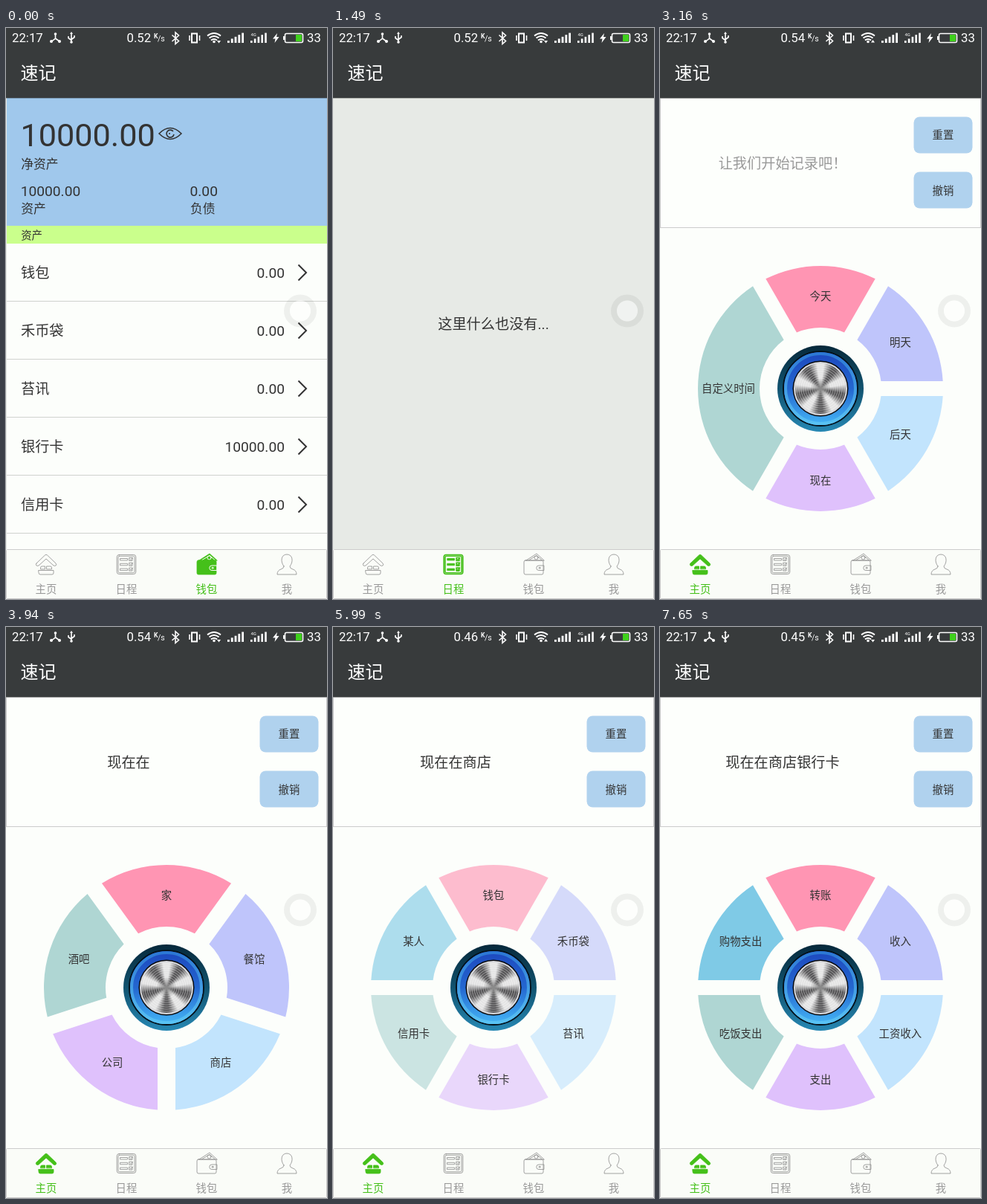
Write an HTML page that moves like this. It is 432 by 768 pixels and loops after 8000 ms.

```html
<!DOCTYPE html>
<html lang="zh-CN">
<head>
<meta charset="utf-8">
<title>速记</title>
<style>
  html, body { margin: 0; width: 100%; height: 100%; overflow: hidden; background: #fcfefb; }
  svg { display: block; }
  text { font-family: Roboto, "Noto Sans CJK SC", "Noto Sans CJK", sans-serif; fill: #333; }
  .mid { text-anchor: middle; }
  .end { text-anchor: end; }
  .s14 { font-size: 14.4px; }
  .s17 { font-size: 16.8px; }
  .s19 { font-size: 19.2px; }
  .menu text { fill-opacity: 1; }
  .status text { fill: #fff; font-size: 16.8px; }
  .line { fill: none; stroke: #fff; stroke-width: 1.6; }
  .tab text { fill: #999; }
  .tab .icon { fill: none; stroke: #8c8c8c; stroke-width: .8; stroke-linejoin: round; stroke-linecap: round; }
  .tab.on text { fill: #45c01a; }
  .tab.on .icon { stroke: #45c01a; stroke-width: 1.6; }
  .tab.on .solid { fill: #45c01a; stroke-width: .8; }
  .tab.on .cut { stroke: #fafcf8; stroke-width: 1; }
  .knob {
    width: 72px; height: 72px; border-radius: 50%; box-sizing: border-box; border: 2.5px solid #d8d9dd;
    background:
      radial-gradient(circle, #8a8a8a 0 2px, #8a8a8a00 14px),
      repeating-radial-gradient(circle, #fff0 0 1.2px, #ffffff50 1.8px 2.2px, #fff0 3px),
      repeating-conic-gradient(#e4e4e4 0 8deg, #555456 30deg 42deg, #e4e4e4 64deg 72deg);
  }
</style>
</head>
<body>
<svg width="432" height="768" viewBox="0 0 432 768">
  <defs>
    <linearGradient id="rimDark" x2="0" y2="1"><stop stop-color="#101116"/><stop offset="1" stop-color="#202333"/></linearGradient>
    <linearGradient id="bowlDark" x2="0" y2="1"><stop stop-color="#403e55"/><stop offset=".5" stop-color="#2b303e"/><stop offset="1" stop-color="#2a303c"/></linearGradient>
    <linearGradient id="rimBlue" x2="0" y2="1"><stop stop-color="#06283a"/><stop offset=".5" stop-color="#11536f"/><stop offset="1" stop-color="#2788b4"/></linearGradient>
    <linearGradient id="bowlBlue" x2="0" y2="1"><stop stop-color="#1d48be"/><stop offset=".5" stop-color="#2467d0"/><stop offset="1" stop-color="#45b6f6"/></linearGradient>
    <linearGradient id="edgeBlue" x2="0" y2="1"><stop stop-color="#2c78d4"/><stop offset="1" stop-color="#59c2f3"/></linearGradient>
  </defs>
  <rect width="432" height="768" fill="#fcfefb"/>

  <g id="strip">
    <g id="home">
      <rect x=".5" y="94.5" width="431" height="174" fill="#fdfffc" stroke="#ccc"/>
      <g id="phrases" class="mid s19"></g>
      <rect x="341.500" y="119.500" width="79" height="49" rx="8" fill="#b0d2ee"/>
      <rect x="341.500" y="193.500" width="79" height="49" rx="8" fill="#b0d2ee"/>
      <text class="mid s14" x="381" y="149">重置</text>
      <text class="mid s14" x="381" y="224">撤销</text>
      <g id="menus"></g>
      <g transform="translate(216 485)">
        <g id="idle">
          <circle r="58" fill="url(#rimDark)"/>
          <circle r="50" fill="url(#bowlDark)" stroke="#07080b" stroke-width="2"/>
          <circle r="44" fill="none" stroke="#3b4152" stroke-opacity=".5"/>
        </g>
        <g id="lit">
          <circle r="58" fill="url(#rimBlue)"/>
          <circle r="50" fill="url(#bowlBlue)" stroke="#04121c" stroke-width="2"/>
          <circle r="47" fill="none" stroke="url(#edgeBlue)" stroke-width="4"/>
        </g>
        <circle r="37.5" fill="#08090c"/>
        <foreignObject x="-36" y="-36" width="72" height="72"><div class="knob"></div></foreignObject>
      </g>
    </g>

    <g transform="translate(432)">
      <rect y="94" width="432" height="607" fill="#e7eae6"/>
      <text class="mid s19" x="216" y="405">这里什么也没有...</text>
    </g>

    <g id="wallet" transform="translate(864)">
      <rect y="94" width="432" height="172" fill="#a0c8ec"/>
      <text x="18.500" y="159" font-size="43.2">10000.00</text>
      <g fill="none" stroke="#333" stroke-width="1.6">
        <path d="M205 142Q220 127 235 142Q220 157 205 142Z"/>
        <path d="M224 139a5 5 0 1 0 1 4M220 142h-2"/>
      </g>
      <text class="s17" x="19.200" y="189">净资产</text>
      <text class="s19" x="18.700" y="226">10000.00</text>
      <text class="s17" x="19.200" y="249">资产</text>
      <text class="s19" x="246.500" y="226">0.00</text>
      <text class="s17" x="247" y="249">负债</text>
      <rect y="266" width="432" height="24" fill="#caff8c"/>
      <text class="s14" x="19.200" y="284">资产</text>
    </g>
  </g>

  <rect width="432" height="94" fill="#383b3c"/>
  <rect y="94" width="432" height="1" fill-opacity=".25"/>
  <text x="19.5" y="69" font-size="24" style="fill:#fff">速记</text>

  <g class="status">
    <text x="8" y="19">22:17</text>
    <g class="line">
      <path d="M66.500 8v6l-5 4M66.500 14l5.500 4"/>
      <path d="M88 7v12M84 11v2.500l4 3M92 10v2.500l-4 3"/>
      <path d="M223.500 9.500l9 8-4.500 4V6l4.500 4-9 8"/>
      <rect x="250" y="7.500" width="7" height="12" stroke-width="2"/>
      <path d="M247 10v7M260.500 10v7"/>
      <path d="M271 10.500q9-7 18 0M273.500 13.500q6.500-5 13 0M276 16.500q4-3 8 0" stroke-width="2"/>
      <rect x="375.500" y="7.500" width="24" height="12" rx="2"/>
    </g>
    <g fill="#fff">
      <circle cx="66.500" cy="8" r="1.800"/><circle cx="61" cy="18" r="2"/><circle cx="72" cy="18" r="2"/>
      <path d="M88 5l2 3h-4z"/><circle cx="88" cy="19" r="1.800"/>
      <circle cx="280" cy="18.500" r="1.800"/>
      <path id="arrowDown" d="M284 17h5l-2.500 3.500z"/>
      <path id="arrowUp" d="M284 19.500h5l-2.500-3.500z"/>
      <path d="M365 7l-6 7.500h3.500l-1 5.500 6-8h-3.500z"/>
      <rect x="373" y="11" width="2" height="5"/>
      <g id="bars"></g>
    </g>
    <rect x="390" y="9" width="8" height="9" fill="#3fd01c"/>
    <g id="speeds"></g>
    <text x="199" y="14" style="font-size:8.500px;font-weight:700">K</text>
    <text x="204" y="18" style="font-size:10.500px">/s</text>
    <text x="329.500" y="11" style="font-size:6px">4G</text>
    <text x="405" y="19">33</text>
  </g>

  <rect x=".5" y="701.500" width="431" height="66" rx="1" fill="#fafcf8" stroke="#ccc"/>
  <g id="tabs"></g>
  <circle cx="396" cy="380.500" r="18" fill="none" stroke="#000" stroke-opacity=".055" stroke-width="8"/>
  <circle cx="396" cy="380.500" r="14" fill="#fff" fill-opacity=".4"/>
</svg>

<script>
const LOOP = 8000;
const $ = id => document.getElementById(id);
const add = (id, markup) => $(id).insertAdjacentHTML('beforeend', markup);

// Wallet rows
[['钱包', '0.00'], ['禾币袋', '0.00'], ['苔讯', '0.00'], ['银行卡', '10000.00'], ['信用卡', '0.00']].forEach(([name, sum], i) => {
  const y = 290 + i * 78;
  add('wallet', `<text class="s19" x="19" y="${y + 46}">${name}</text>
    <text class="s19 end" x="374" y="${y + 46}">${sum}</text>
    <path d="M392.500 ${y + 28.5}l10.500 10.500-10.500 10.500" fill="none" stroke="#333" stroke-width="2"/>
    <rect y="${y + 77}" width="432" height="1" fill="#d0d2cf"/>`);
});

// Signal bars
[298, 329].forEach((x, k) => {
  for (let i = 0; i < 5; i++) {
    const h = 3 + i * 2.6;
    add('bars', `<rect x="${x + i * 4.8}" y="${20 - h}" width="${k ? 2.6 : 2.8}" height="${h}"/>`);
  }
});

// Tabs
const listRow = y => `<rect class="solid" x="-8" y="${y}" width="9.500" height="2.500"/>
  <rect x="4" y="${y - 1}" width="4" height="4"/><path d="M5 ${y + 1}l1.200 1 2.300-3"/>`;
const icons = [
  `<path class="solid" d="M-13 720L-1.500 709q1.500-1.300 3 0L13 720q1.500 2 0 3t-3 0L0 714-10 723q-1.500 1-3 0t0-3Z"/>
   <path class="solid" d="M-7.500 727.500V726q0-2 2-2H-1.500V727.500ZM.5 727.500V724H5.500q2 0 2 2V727.500Z"/>
   <path class="solid" d="M-10 729.500H10V733q0 2-2 2H-8q-2 0-2-2Z"/>`,
  `<rect x="-12.800" y="708.500" width="25.600" height="26" rx="3"/>
   <rect x="-11" y="710.300" width="22" height="22.400" rx="1.500"/>` + [713.5, 720.3, 727.1].map(listRow).join(''),
  `<path class="solid" d="M-10 716L4 707l10 9Z"/><circle class="cut" cx="3.500" cy="712.500" r="2.500"/>
   <path class="cut" d="M-6 715.500L4 709.500l7 6"/>
   <path class="solid" d="M-11 716H11q2 0 2 2V733q0 2-2 2H-11q-2 0-2-2V718q0-2 2-2Z"/>
   <path class="cut" d="M13.500 723H7a3 3 0 0 0 0 6.500h6.500Z"/><circle class="cut" cx="8" cy="726.200" r="1"/>`,
  `<path d="M-4 724C-9 718-8 708 0 708s9 10 4 16q0 3 4 4 5 1.500 5 7H-13q0-5.500 5-7 4-1 4-4Z"/>`
];
['主页', '日程', '钱包', '我'].forEach((name, i) => add('tabs',
  `<g class="tab" transform="translate(${54 + i * 108})"><g class="icon">${icons[i]}</g>
   <text class="mid s14" y="760">${name}</text></g>`));
const tabs = [...document.querySelectorAll('.tab')];

// Ring menus
const OUTER = 165, INNER = 82, LABEL = 124;
const point = (r, a) => `${(216 + r * Math.sin(a)).toFixed(2)} ${(485 - r * Math.cos(a)).toFixed(2)}`;

function slice(from, to, gap) {
  const o = Math.asin(gap / OUTER), n = Math.asin(gap / INNER);
  return `M${point(OUTER, from + o)}A${OUTER} ${OUTER} 0 0 1 ${point(OUTER, to - o)}` +
    `L${point(INNER, to - n)}A${INNER} ${INNER} 0 0 0 ${point(INNER, from + n)}Z`;
}

const colors = ['#ff95b3', '#bfc5fb', '#c2e4fd', '#dfc1fc', '#afd6d3', '#7fcae6'];

function ring(names, parts) {
  const step = 2 * Math.PI / parts;
  let from = -step / 2;
  return names.map((name, i) => {
    const to = i < names.length - 1 ? from + step : 2 * Math.PI - step / 2;
    const [x, y] = point(LABEL, (from + to) / 2).split(' ');
    const d = slice(from, to, 60 / parts);
    from = to;
    return `<path d="${d}" fill="${colors[i]}"/><text class="mid s14" x="${x}" y="${+y + 5.3}">${name}</text>`;
  }).join('');
}

const menus = [
  { names: '今天 明天 后天 现在 自定义时间', parts: 6,
    alpha: [[0, 0], [2610, .3], [2730, .65], [2850, .95], [3160, 1], [3300, .8], [3420, .4], [3540, 0]] },
  { names: '家 餐馆 商店 公司 酒吧', parts: 5,
    alpha: [[0, 0], [3540, .3], [3660, .6], [3810, .85], [3940, 1], [5870, 0]] },
  { names: '钱包 禾币袋 苔讯 银行卡 信用卡 某人', parts: 6,
    alpha: [[0, 0], [5870, .3], [5990, .62], [6110, .9], [6260, 1], [7410, .5], [7530, 0]] },
  { names: '转账 收入 工资收入 支出 吃饭支出 购物支出', parts: 6,
    alpha: [[0, 0], [7530, .5], [7650, 1]] }
];
menus.forEach(m => {
  add('menus', `<g class="menu">${ring(m.names.split(' '), m.parts)}</g>`);
  m.node = $('menus').lastElementChild;
});

// Texts that replace each other
const phrases = ['让我们开始记录吧！', '现在在', '现在在商店', '现在在商店银行卡'];
phrases.forEach((s, i) => add('phrases', `<text x="165" y="188.500"${i ? '' : ' style="fill:#999"'}>${s}</text>`));
['0.52', '0.54', '0.46', '0.45'].forEach(s => add('speeds', `<text x="162.500" y="19">${s}</text>`));

// Stepped tracks: [start in ms, value]
const slide = [[0, 863], [120, 864], [950, 510], [1100, 452], [1220, 437], [1340, 433], [1490, 432],
  [1650, 347], [1800, 100], [1950, 19], [2070, 3], [2220, 0]];
const activeTab = [[0, 2], [550, 1], [1650, 0]];
const phrase = [[0, 0], [3420, 1], [5870, 2], [7410, 3]];
const speed = [[0, 0], [1650, 1], [4370, 2], [7410, 3]];
const opened = [[0, 0], [2610, 1]];
const arrow = [[0, 0], [2460, 1], [3300, 0], [5320, 1], [6260, 0]];

const at = (track, t) => track.findLast(([start]) => start <= t)[1];
const show = (node, on) => { node.style.visibility = on ? 'visible' : 'hidden'; };
const pick = (nodes, index) => [...nodes].forEach((node, i) => show(node, i === index));

function draw() {
  const t = performance.now() % LOOP;
  $('strip').setAttribute('transform', `translate(${-at(slide, t)})`);
  tabs.forEach((tab, i) => tab.classList.toggle('on', i === at(activeTab, t)));
  pick($('phrases').children, at(phrase, t));
  pick($('speeds').children, at(speed, t));
  pick([$('idle'), $('lit')], at(opened, t));
  pick([$('arrowDown'), $('arrowUp')], at(arrow, t));
  menus.forEach(({ node, alpha }) => {
    const a = at(alpha, t);
    show(node, a > 0);
    node.setAttribute('fill-opacity', a);
  });
  requestAnimationFrame(draw);
}
draw();
</script>
</body>
</html>
```
